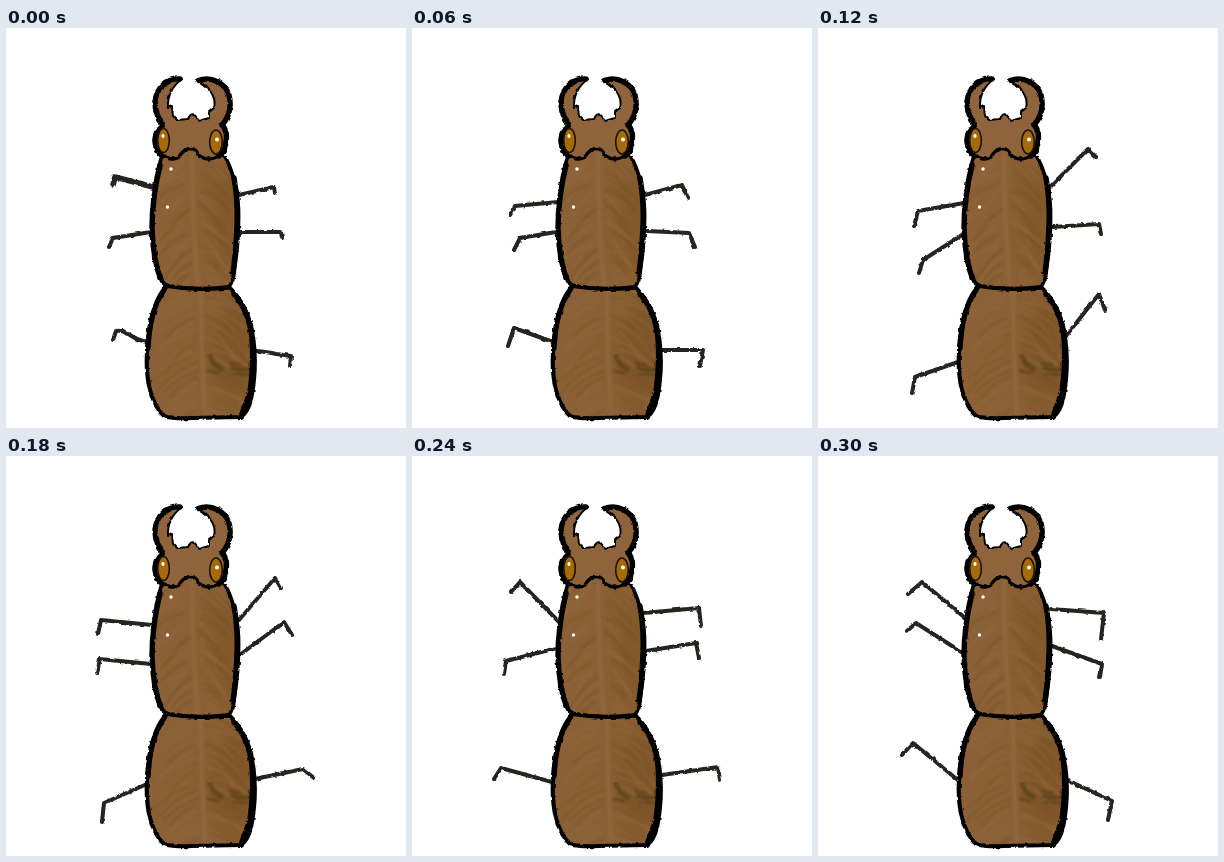
An HTML page that plays this animation: 400 by 400 pixels, repeating every 0.36 s.

```html
<!DOCTYPE html>
<html lang="en">
<head>
<meta charset="utf-8">
<title>Crawling beetle</title>
<style>
  html, body { margin: 0; width: 100%; height: 100%; overflow: hidden; background: #fff; }
  svg { display: block; width: 100%; height: 100%; }
  path, ellipse { stroke-linecap: round; stroke-linejoin: round; }
  .pose {
    fill: none; stroke: #242420; stroke-width: 4;
    visibility: hidden;
    animation: step 360ms step-end infinite;
    animation-delay: calc(var(--i) * 60ms - 360ms);
  }
  @keyframes step {
    0% { visibility: visible; }
    16.6667%, 100% { visibility: hidden; }
  }
  .heavy { stroke-width: 5.6; }
  .skin { fill: #8b6036; }
  .head { fill: #8f643c; }
  .line { fill: none; stroke: #000; }
  .vein { fill: none; }
</style>
</head>
<body>
<svg viewBox="0 0 400 400">
  <defs>
    <path id="thorax" d="M156 127C151 143 148 163 146.500 183C145 207 148 231 153 247Q156 256 163 258Q191 263 222 260Q228 254 229 238C232 218 233 199 232.500 180C231 160 227 142 218 127Q187 113 156 127Z"/>
    <path id="abdomen" d="M161 258C151 270 146 286 143 303C140 324 140 346 144 362Q149 380 158 388Q166 391 186 390L235 389Q242 384 245 371C249 351 250 329 247 309C244 287 235 271 223 259Q191 263 161 258Z"/>
    <clipPath id="inThorax"><use href="#thorax"/></clipPath>
    <clipPath id="inAbdomen"><use href="#abdomen"/></clipPath>
    <filter id="soft"><feGaussianBlur stdDeviation=".8"/></filter>
    <filter id="haze" x="-50%" width="200%"><feGaussianBlur stdDeviation="9"/></filter>
    <filter id="rough" filterUnits="userSpaceOnUse" x="0" y="0" width="400" height="400" color-interpolation-filters="sRGB">
      <feTurbulence type="fractalNoise" baseFrequency=".18" numOctaves="2" seed="4"/>
      <feDisplacementMap in="SourceGraphic" scale="3" xChannelSelector="R" yChannelSelector="G"/>
    </filter>
  </defs>

  <g filter="url(#rough)">
    <g class="pose" style="--i:0">
      <path class="heavy" d="M147 159L109 149L107 157"/>
      <path d="M233 167L268 159L269 165M145 204L107 210L103 219M234 204L275 204L276 210M141 314Q131 312 124 307Q117 302 110 303L107 312M250 323Q262 324 270 326L285 328L284 338"/>
    </g>
    <g class="pose" style="--i:1">
      <path d="M146 174L103 178L98 187M233 167L270 157L276 170M144 204L108 210L102 222M235 203L277 205L283 219M141 314L102 300L96 318M250 322L291 322L288 338"/>
    </g>
    <g class="pose" style="--i:2">
      <path d="M146 175L100 183L96 198M231 160L270 121L278 129M144 207L105 232L101 245M235 199L281 196L283 206M140 334L97 349L94 365M248 308L281 266L287 282"/>
    </g>
    <g class="pose" style="--i:3">
      <path d="M146 169L95 164L92 178M233 164L269 122L275 132M145 208L94 203L91 217M235 198L278 166L286 179M141 328L98 347L96 366M249 323L297 313L308 322"/>
    </g>
    <g class="pose" style="--i:4">
      <path d="M146 165L108 126L99 136M231 157L287 152L289 170M145 192L94 205L92 218M234 195L284 187L287 202M140 326L89 312L82 323M250 319L306 311L308 324"/>
    </g>
    <g class="pose" style="--i:5">
      <path d="M146 161L104 126L90 138M233 153L286 157L283 183M145 197L98 167L89 175M234 190L284 208L282 221M141 325L95 287L84 299M249 324L294 345L290 364"/>
    </g>
  </g>

  <use href="#abdomen" class="skin"/>
  <use href="#thorax" class="skin"/>
  <g clip-path="url(#inThorax)">
    <ellipse cx="222" cy="200" rx="17" ry="56" fill="#7d5422" opacity=".55" filter="url(#haze)"/>
    <g id="thoraxVeins" class="vein" filter="url(#soft)"></g>
  </g>
  <g clip-path="url(#inAbdomen)">
    <ellipse cx="229" cy="325" rx="24" ry="50" fill="#795020" opacity=".65" filter="url(#haze)"/>
    <g id="abdomenVeins" class="vein" filter="url(#soft)"></g>
    <g fill="none" stroke="#59431e" filter="url(#soft)" opacity=".75">
      <path stroke-width="5" d="M204 328L208 336L215 341"/>
      <path stroke-width="4" d="M226 340Q235 343 245 341"/>
      <path stroke-width="2.500" d="M202 343L212 345M228 346L243 347M224 335L234 337"/>
    </g>
  </g>
  <g filter="url(#rough)">
    <use href="#abdomen" class="line" stroke-width="4.200"/>
    <use href="#thorax" class="line" stroke-width="3.600" clip-path="url(#below)"/>
    <path class="line" stroke-width="5.400" d="M154 137C149 158 146 178 146 200Q147 232 155 252M158 262C147 277 143 300 142 320M228 150Q232 172 231 197Q230 224 227 244M228 266Q243 283 246 310Q248 336 244 364L236 386"/>
  </g>

  <path class="head" d="M176 51C162 47 150 59 149 74C149 85 153 91 157 97Q148 104 149 114Q150 125 157 128Q166 134 174 128C178 121 186 119 191 124C194 131 203 132 208 130Q219 127 221 113Q221 102 216 97C224 89 227 78 223 66C219 54 205 47 190 52C202 58 211 68 208 80L203 84L203 90L196 92Q192 94 191 90Q186 82 182 91L171 92L167 88L166 78L162 80Q161 62 176 51Z"/>
  <g filter="url(#rough)">
    <path class="line" stroke-width="2" d="M176 51Q161 62 162 80L166 78L167 88L171 92L182 91Q186 82 191 90Q192 94 196 92L203 90L203 84L208 80C211 68 202 58 190 52"/>
    <path class="line" stroke-width="5.400" d="M174 51C161 50 150 60 149 74C149 85 153 91 157 97Q148 104 149 114Q150 124 157 128M192 52.500C206 48 219 55 223 67C226 79 223 89 216 97Q222 103 220 114Q219 124 213 128"/>
    <path class="line" stroke-width="3.400" d="M157 127Q165 134 173 129C178 120 186 118 191 124C194 131 203 132 208 130L216 127"/>
  </g>

  <g fill="#a66b08" stroke="#1c1204" stroke-width="1.600">
    <ellipse cx="157.500" cy="112.500" rx="5.800" ry="12"/>
    <ellipse cx="210" cy="114" rx="6.300" ry="12"/>
  </g>
  <g fill="#fff">
    <ellipse cx="157" cy="108" rx="1.600" ry="2"/>
    <circle cx="211" cy="111.500" r="2"/>
    <circle cx="165" cy="141" r="1.700"/>
    <circle cx="161.500" cy="179" r="1.700"/>
  </g>
  <clipPath id="below"><path d="M130 128H172L184 112L192 128H250V270H130Z M0 0"/></clipPath>
</svg>
<script>
  let seed = 7;
  const rand = () => (seed = (seed * 16807) % 2147483647) / 2147483647;

  function stroke(group, d, color, width, opacity) {
    const p = document.createElementNS('http://www.w3.org/2000/svg', 'path');
    for (const [k, v] of Object.entries({ d, stroke: color, 'stroke-width': width, opacity })) {
      p.setAttribute(k, v);
    }
    group.append(p);
  }

  // Leaf-like side veins arching down from a pale midrib.
  function veins(id, x0, y0, x1, y1, reach) {
    const group = document.getElementById(id);
    for (let y = y0 - 4; y < y1 + 12; y += 5.5) {
      const x = x0 + (x1 - x0) * (y - y0) / (y1 - y0);
      for (const side of [-1, 1]) {
        const len = reach * (0.45 + rand() * 0.5);
        const drop = 18 + rand() * 16;
        const sx = x + side * (3 + rand() * 10);
        const sy = y + rand() * 4;
        const d = `M${sx} ${sy}Q${sx + side * len * 0.6} ${sy + drop * 0.3} ${sx + side * len} ${sy + drop}`;
        stroke(group, d, rand() < 0.6 ? '#785226' : '#93683e', 1.4 + rand() * 2, 0.45);
      }
    }
    stroke(group, `M${x0} ${y0}Q${x0} ${(y0 + y1) / 2} ${x1} ${y1}`, '#93683f', 4, 0.9);
  }

  veins('thoraxVeins', 186, 126, 192, 258, 38);
  veins('abdomenVeins', 195, 264, 199, 386, 48);
</script>
</body>
</html>
```
